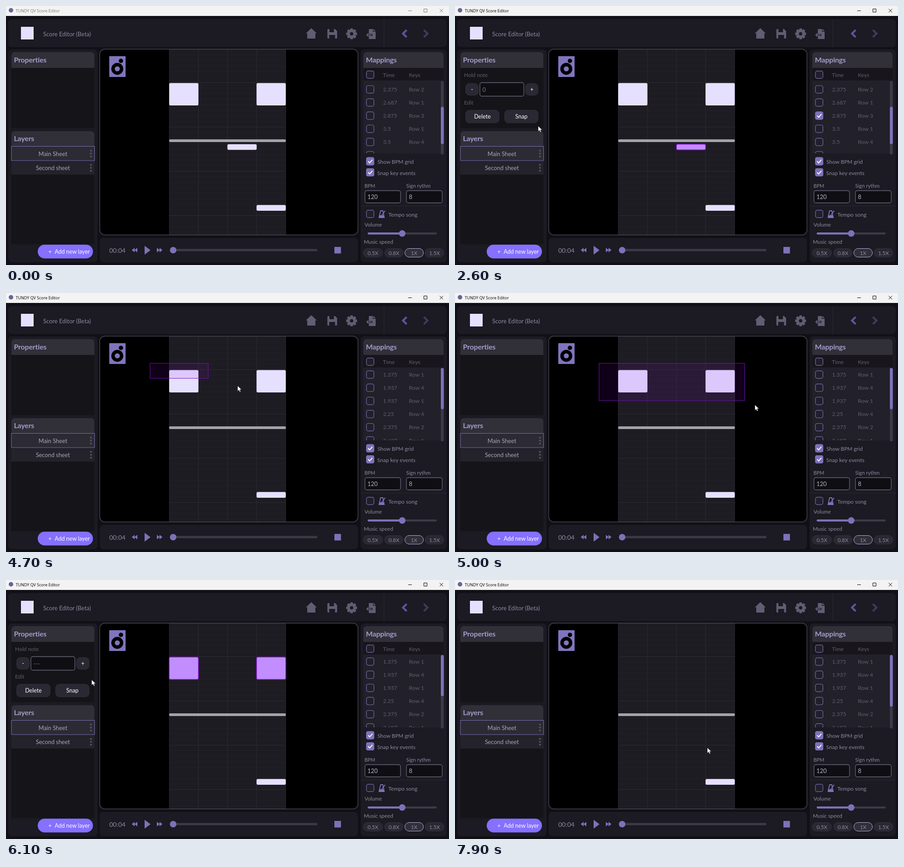
These frames come from a looping animation (978 px wide and 573 px high, 8000 ms). An HTML page:

```html
<!DOCTYPE html>
<html lang="en">
<head>
<meta charset="utf-8">
<title>Score editor</title>
<style>
  html, body { margin: 0; width: 100%; height: 100%; overflow: hidden; background: #121017; }
  svg { display: block; width: 100vw; height: 100vh; }
  text { font-family: Lato, sans-serif; font-weight: 400; white-space: pre; }
  .bar { font-family: "Open Sans", sans-serif; }
  .head { font-weight: 700; }
</style>
</head>
<body>
<svg id="stage" viewBox="0 0 978 573"></svg>
<script>
const NS = 'http://www.w3.org/2000/svg';
const stage = document.getElementById('stage');

const C = {
  panel: '#1c1a22', inset: '#151419', head: '#312f38', lane: '#1e1c23',
  text: '#8e89a0', dim: '#625e70', icon: '#625d73', violet: '#7d72b9',
  rail: '#3d3a47', button: '#2a2832', note: '#e6e0ff', picked: '#c28dff', edge: '#8412d8'
};

function el(tag, attrs, parent = stage) {
  const node = document.createElementNS(NS, tag);
  set(node, attrs);
  parent.appendChild(node);
  return node;
}
function set(node, attrs) {
  for (const key in attrs) node.setAttribute(key, attrs[key]);
}
const group = (parent = stage, attrs = {}) => el('g', attrs, parent);
const rect = (x, y, width, height, fill, rx = 0, parent = stage, more = {}) =>
  el('rect', { x, y, width, height, fill, rx, ...more }, parent);
const circle = (cx, cy, r, fill, parent = stage) => el('circle', { cx, cy, r, fill }, parent);
const path = (d, fill, parent = stage, more = {}) => el('path', { d, fill, ...more }, parent);
const line = (d, stroke, width = 1, parent = stage, more = {}) =>
  path(d, 'none', parent, { stroke, 'stroke-width': width, ...more });
function text(str, x, y, size, fill, parent = stage, more = {}) {
  const node = el('text', { x, y, fill, 'font-size': size, ...more }, parent);
  node.textContent = str;
  return node;
}
const mid = { 'text-anchor': 'middle' };
const show = (node, on) => node.setAttribute('visibility', on ? 'visible' : 'hidden');

function heading(str, x, y, w, h) {
  path(`M${x} ${y + h}v${8 - h}q0-8 8-8h${w - 16}q8 0 8 8v${h - 8}z`, C.head);
  text(str, x + 5.5, y + h / 2 + 5.8, 16, '#a39bc9', stage, { class: 'head', 'letter-spacing': -0.2 });
}
function checkbox(x, y, parent = stage, checked = false) {
  const g = group(parent);
  rect(x + .7, y + .7, 16.6, 16.6, '#221f2b', 4, g, { stroke: '#6c639c', 'stroke-width': 1.4 });
  const tick = group(g);
  rect(x, y, 18, 18, C.violet, 4, tick);
  line(`M${x + 4.5} ${y + 9}l3.4 3.6 6-7`, '#fff', 2, tick);
  show(tick, checked);
  return tick;
}
function field(x, y, w, h, str, parent = stage, fill = '#b5b0c4') {
  rect(x, y, w, h, '#0f0e13', 4, parent, { stroke: '#6a6678', 'stroke-width': 1.3 });
  return text(str, x + 5.5, y + h / 2 + 5, 13, fill, parent);
}
function button(x, y, w, h, label, parent) {
  const box = rect(x + .5, y + .5, w - 1, h - 1, C.button, 8, parent, { stroke: '#302e38' });
  text(label, x + w / 2, y + h / 2 + 4.5, 12.5, '#fff', parent, mid);
  return box;
}

// Window bar
rect(0, 0, 978, 22, '#f3f3f3');
circle(11, 9.5, 5, '#686493');
const title = text('TUNDY QV Score Editor', 21.5, 13.5, 9, '#777', stage, { class: 'bar' });
const controls = group(stage, { fill: 'none' });
path('M888 10.5h8M922.5 6.5h7v7h-7zM957.5 6.5l7.5 7.5M965 6.5l-7.5 7.5', 'none', controls);

// Header
rect(5, 29, 968, 62, C.panel, 8);
rect(33, 46, 28, 28, C.note);
text('Score Editor (Beta)', 82, 66.5, 13, C.text);
line('M834.5 29v62', '#2b2933');
path('M674 49l12 11.5h-3v11.5h-18v-11.5h-3z', C.icon);
path('M709.5 53q0-2 2-2h15l4.5 4.5v14.5q0 2-2 2h-17.5q-2 0-2-2zM714 51h10v7h-10zM713.5 64h13v8h-13z',
  C.icon, stage, { 'fill-rule': 'evenodd' });
el('circle', { cx: 763, cy: 61.5, r: 6.6, fill: 'none', stroke: C.icon, 'stroke-width': 5.6 });
for (let i = 0; i < 8; i++)
  rect(760, 49.5, 6, 5, C.icon, 1.2, stage, { transform: `rotate(${i * 45} 763 61.5)` });
path('M801 51h9v6h6v16h-15v-7h8v-4h-8z', C.icon);
path('M811 50.5l5 5h-5z', C.icon);
line('M807 64h-10M800 60.5l-3.5 3.5 3.5 3.5', C.icon, 2);
line('M884.5 53l-8 8 8 8', '#5f5498', 4.5);
line('M922.5 53l8 8-8 8', '#3f3960', 4.5);

// Left column
rect(5, 96, 197, 471, C.panel, 8);
rect(12, 137, 183, 133, C.inset);
heading('Properties', 12, 102, 183, 35);
rect(12, 310, 183, 217, C.inset);
heading('Layers', 12, 277, 183, 33);
rect(12, 343, 183, 30, '#24222a');
rect(12, 310.5, 183.5, 31.5, '#2c2a33', 0, stage, { stroke: C.violet });
text('Main Sheet', 103.5, 331.5, 12.8, '#aaa5bb', stage, mid);
text('Second sheet', 103.5, 363, 12.8, '#aaa5bb', stage, mid);
for (const top of [320, 351.5])
  for (let i = 0; i < 3; i++) circle(187.5, top + i * 6.5, 2.1, '#56525f');
rect(70, 528, 122, 30.5, '#8570ff', 15.25);
text('+', 97, 548, 12.5, '#fff', stage, mid);
text('Add new layer', 107.5, 548, 12.4, '#fff');

const props = group();
text('Hold note', 20, 156.5, 12, C.dim, props);
button(23, 171, 29, 27, '-', props);
const hold = field(55, 169.5, 97, 30, '---', props, '#77727f');
button(155, 171, 29, 27, '+', props);
text('Edit', 20, 217.5, 12, C.dim, props);
const del = button(23, 230, 75, 29, 'Delete', props);
button(109, 230, 75, 29, 'Snap', props);

// Play field
rect(207, 95.5, 570, 411, '#000', 11);
rect(360, 96, 258, 410.5, C.lane);
for (let i = -6; i < 28; i++)
  line(`M360 ${169.5 + i * 12.25}h258`, i % 8 ? '#222027' : '#2d2b32');
for (let i = 0; i < 5; i++) line(`M${360.5 + i * 64.25} 96v410.5`, '#2d2b32');
rect(207, 95.5, 570, 411, 'none', 11, stage, { stroke: '#47444f', 'stroke-width': 1.4 });
rect(228, 111, 36, 46, '#8075bd', 1);
circle(245.7, 139, 13.2, '#000');
circle(245.7, 139, 5.6, '#8075bd');
circle(253.7, 121.3, 4.8, '#000');
rect(360, 295, 258, 6, '#a5a3a9', 3);
const note = (col, y, h) => rect(360.2 + col * 64.3, y, 64.6, h, C.note, 3);
const longNotes = [note(0, 170.5, 49.5), note(3, 170.5, 49.5)];
const tapNote = note(2, 305.7, 12.6);
note(3, 440.3, 12.8);

// Transport
rect(207, 513, 570, 54, C.panel, 8);
text('00:04', 228, 546, 14, C.text);
path('M284 535v10l-6.5-5zM290 535v10l-6.5-5zM333 535v10l6.5-5zM339 535v10l6.5-5zM306 530.5v19.5l13-9.75z', C.violet);
rect(369, 537.5, 318.5, 5, C.rail, 2.5);
circle(369, 540.2, 7.2, C.violet);
rect(725, 533, 14.5, 14.5, C.violet);

// Right column
rect(783, 96, 190, 471, C.panel, 8);
rect(789, 137, 177, 28, '#18161c');
heading('Mappings', 789, 102, 177, 35);
line('M789 165.5h177', '#26242d');
checkbox(795, 143);
text('Time', 832, 156.5, 12, C.dim);
text('Keys', 889.5, 156.5, 12, C.dim);

const clip = el('clipPath', { id: 'rows' });
rect(789, 166, 171, 160, '#fff', 0, clip);
const list = group();
rect(789, 166, 171, 160, '#222029', 0, list);
const rows = group(group(list, { 'clip-path': 'url(#rows)' }));
const ticks = [
  ['1.375', 1], ['1.937', 4], ['1.937', 1], ['2.25', 4], ['2.375', 2],
  ['2.687', 1], ['2.875', 3], ['3.5', 1], ['3.5', 4], ['4.187', 2]
].map(([time, key], i) => {
  const y = 180.5 + i * 29.1;
  text(time, 832.5, y + 4.5, 12.2, C.dim, rows);
  text('Row ' + key, 889.5, y + 4.5, 12.2, C.dim, rows);
  return checkbox(795, y - 9, rows);
});
rect(960, 166, 6.5, 162.5, C.rail, 3, list);
const thumb = rect(960, 166, 6.5, 91, C.violet, 3, list);

checkbox(795, 334.5, stage, true);
text('Show BPM grid', 820, 348.5, 11.8, C.text);
checkbox(795, 359, stage, true);
text('Snap key events', 819.5, 373.5, 12, C.text);
text('BPM', 791.5, 401.5, 10.8, C.text);
text('Sign rythm', 883.5, 401.5, 11.4, C.text);
field(792.5, 408.5, 78.5, 27, '120');
field(884, 408.5, 79, 27, '8');
line('M783 442.5h190', '#2a2832');
checkbox(795, 451);
line('M827 453h5l3 15h-11.5z', C.violet, 1.8);
path('M825 463h9.5l1 5h-12z', C.violet);
line('M829 464l8-11', C.violet, 1.8);
text('Tempo song', 844, 465.5, 12.2, C.text);
text('Volume', 791.5, 487.5, 11.6, C.text);
rect(798.5, 501, 152.5, 4.5, C.rail, 2.2);
rect(798.5, 501, 76.5, 4.5, C.violet, 2.2);
circle(874.7, 503.3, 7.2, C.violet);
text('Music speed', 790, 525.5, 11.8, C.text);
[['0.5X', 788.5, 43], ['0.8X', 836, 41], ['1X', 880.5, 41], ['1.5X', 925, 42]].forEach(([label, x, w]) => {
  const on = label === '1X';
  rect(x, 536.5, w, 19, on ? '#312f3a' : C.button, 9.5, stage, { stroke: on ? '#b9b0e6' : '#34313c' });
  text(label, x + w / 2, 550.5, 11.6, C.text, stage, mid);
});

// Pointer layer
const marquee = rect(0, 0, 0, 0, 'rgba(145,0,225,.11)', 0, stage, { stroke: '#7112b4' });
const arrow = group();
path('M0 0v12.2l2.9-2.7 2 4.3 2.2-1-2-4.2h4z', '#fff', arrow, { stroke: '#111', 'stroke-width': .7 });
const outline = { stroke: '#000', 'stroke-width': .9, 'stroke-linejoin': 'round' };
const openHand = group();
path('M-3.5 7l-3.5-5.5q-1-2 1-2l2 1.8v-6q1-1.8 2 0v-1.5q1.2-1.6 2.2 0v1q1.2-1.3 2.2 0v1.8q1.5-1.3 2.2.4v6l-1.6 4z', '#fff', openHand, outline);
const fist = group();
path('M-3 5.5l-2-3.5v-3.5q1-1.8 2.2-.5v-1.5q1.2-1.5 2.2 0q1.2-1.5 2.3 0q1.3-1 2.2.5q1.5-.6 1.6 1v3.5l-1.5 4z', '#fff', fist, outline);

// Pointer route: time, x, y
const route = [
  [200, 190, 98], [400, 430, 287], [900, 430, 287], [1400, 500, 311], [1500, 501, 312],
  [1700, 505, 317], [2100, 505, 317], [2800, 55, 245], [3900, 55, 245], [4300, 318, 156],
  [4400, 318, 156], [4900, 640, 238], [5000, 662, 247.5], [5300, 685, 257], [5600, 457, 176],
  [5700, 457, 176], [6300, 55, 243], [7600, 55, 243], [7900, 557, 371]
];
function pointer(t) {
  const i = route.findIndex(k => k[0] >= t);
  if (i < 1) return route[i < 0 ? route.length - 1 : 0].slice(1);
  const [a, b] = [route[i - 1], route[i]];
  const p = (t - a[0]) / (b[0] - a[0]);
  return [a[1] + (b[1] - a[1]) * p, a[2] + (b[2] - a[2]) * p];
}
function mark(node, on) {
  set(node, { fill: on ? C.picked : C.note, stroke: on ? C.edge : 'none', 'stroke-width': 1.4 });
}

function draw(ms) {
  const t = Math.floor(ms / 100) * 100; // the screen refreshes ten times a second
  const within = (a, b) => t >= a && t < b;

  const ink = t < 800 ? '#777' : '#000';
  set(title, { fill: ink });
  set(controls, { stroke: ink });

  show(tapNote, t < 3700);
  mark(tapNote, within(1500, 3700));
  for (const n of longNotes) {
    show(n, t < 7400);
    mark(n, within(5400, 7400));
  }

  const single = within(1600, 3700);
  props.style.display = single || within(5300, 7400) ? '' : 'none';
  hold.textContent = single ? '0' : '---';
  const pressed = within(7300, 7400);
  set(del, { fill: pressed ? '#141318' : C.button, stroke: pressed ? '#35323d' : '#302e38' });

  list.style.display = within(3700, 4000) || within(7400, 7700) ? 'none' : '';
  set(rows, { transform: `translate(0 ${t < 3700 ? -112.5 : 0})` });
  show(ticks[6], single);
  set(thumb, t < 3700 ? { y: 223, height: 82.5 } : { y: 166, height: t < 7400 ? 91 : 114 });

  const [x, y] = pointer(t);
  const hand = within(1400, 2200);
  const grab = within(1500, 1600);
  show(arrow, t >= 200 && !hand);
  show(openHand, hand && !grab);
  show(fist, grab);
  for (const c of [arrow, openHand, fist]) set(c, { transform: `translate(${x} ${y})` });

  // The marquee trails the pointer by one refresh
  const [mx, my] = pointer(t - 100);
  show(marquee, within(4600, 5300));
  set(marquee, { x: 318, y: 155.5, width: Math.max(0, mx - 318.5), height: Math.max(0, my - 155.5) });
}

function frame() {
  draw(performance.now() % 8000);
  requestAnimationFrame(frame);
}
frame();
</script>
</body>
</html>
```
